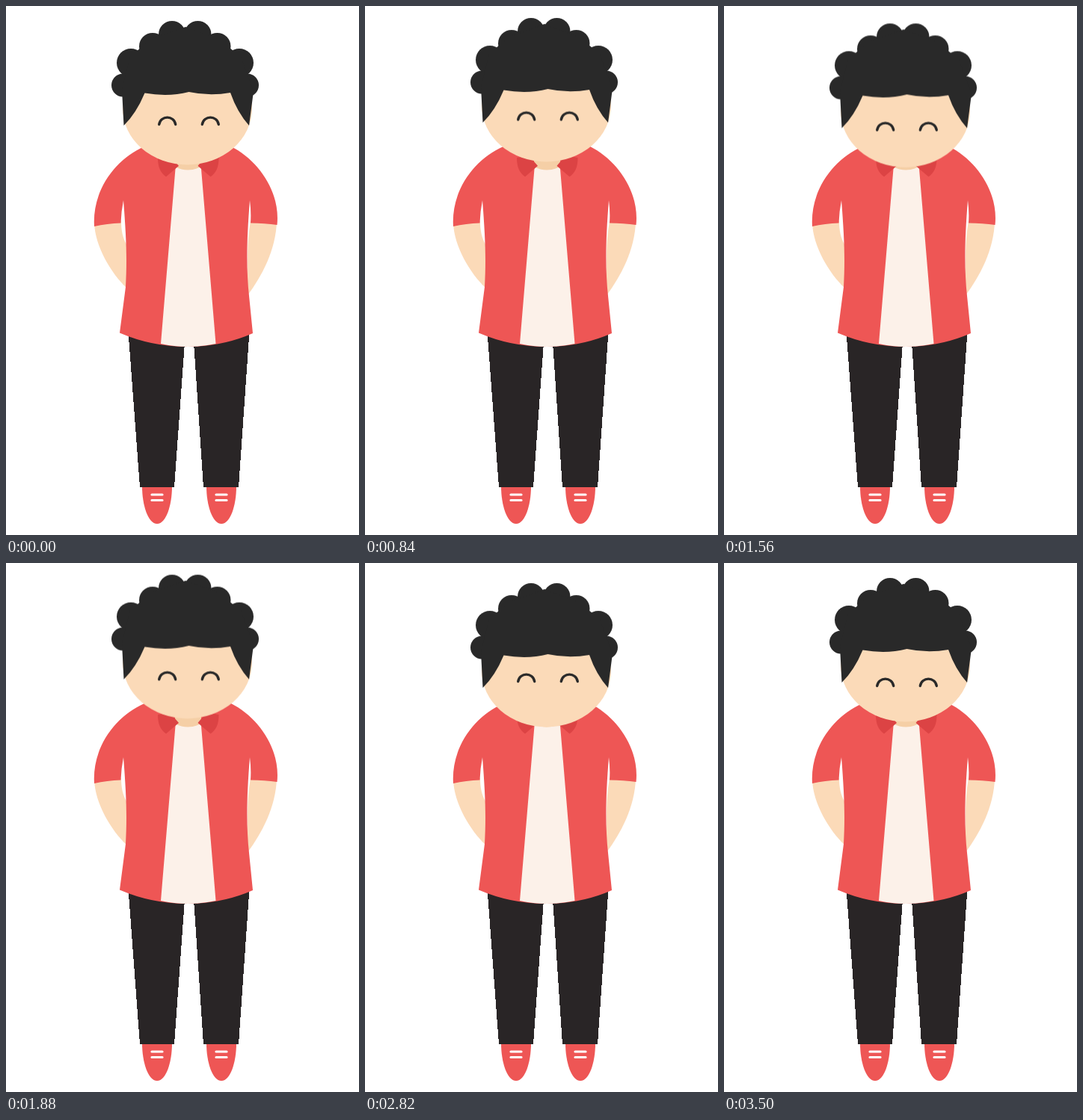
An HTML page without scripts for the animation above (3.64 s loop, 472 px wide and 708 px high).

```html
<!DOCTYPE html>
<html lang="en">
<head>
<meta charset="utf-8">
<title>Nodding boy</title>
<style>
  html, body { margin: 0; width: 100%; height: 100%; overflow: hidden; background: #fff; }
  svg { display: block; width: 472px; height: 708px; }

  .red { fill: #ee5655; }
  .collar { fill: #dc4344; }
  .skin { fill: #fbdab8; }
  .neck { fill: #f5cfa6; }
  .tee { fill: #fcf1e9; }
  .pants { fill: #292526; shape-rendering: crispEdges; }
  .hair { fill: #292929; }
  .laces { fill: none; stroke: #fff; stroke-width: 3.2; stroke-linecap: round; }
  .smile { fill: none; stroke: #292929; stroke-width: 3.4; stroke-linecap: round; }

  .head, .eyes { animation: 3640ms linear infinite; }
  .head { animation-name: nod; }
  .eyes { animation-name: glance; }

  /* 36.4ms per percent; the last 140ms hold still */
  @keyframes nod {
    0% { transform: translateY(0); }
    8% { transform: translateY(-5.8px); }
    15.9% { transform: translateY(-10px); }
    23.08% { transform: translateY(-4px); }
    29.67% { transform: translateY(.8px); }
    34.62% { transform: translateY(5.7px); }
    38.2% { transform: translateY(7.5px); }
    44.51% { transform: translateY(2px); }
    51.65% { transform: translateY(-4.3px); }
    58% { transform: translateY(-10px); }
    65.93% { transform: translateY(-2px); }
    74.18% { transform: translateY(4.5px); }
    77.47% { transform: translateY(7px); }
    81% { transform: translateY(8.3px); }
    89.01% { transform: translateY(3.5px); }
    96.15%, 100% { transform: translateY(0); }
  }
  @keyframes glance {
    0% { transform: translateY(0); }
    10% { transform: translateY(-7px); }
    18% { transform: translateY(-10px); }
    23.08% { transform: translateY(-6.5px); }
    34.62% { transform: translateY(10.5px); }
    39% { transform: translateY(12px); }
    51.65% { transform: translateY(-2.7px); }
    60% { transform: translateY(-9px); }
    65.93% { transform: translateY(-6px); }
    77.47% { transform: translateY(0); }
    88% { transform: translateY(7px); }
    96.15%, 99.99% { transform: translateY(6px); }
    100% { transform: translateY(0); }
  }
</style>
</head>
<body>
<svg viewBox="0 0 472 708">
  <defs>
    <g id="shoe">
      <path class="red" d="M-20 643H20C20 668 12 693 0 693S-20 668-20 643Z"/>
      <path class="laces" d="M-7 654H7M-7 661.5H7"/>
    </g>
    <path id="eye" class="smile" d="M-11 158.5C-9 146 9 146 11 158.5"/>
  </defs>

  <use href="#shoe" x="202"/>
  <use href="#shoe" x="288"/>
  <path class="pants" d="M163.500 436L179 644H225L239 450ZM251 450L264 644H311L325.500 436Z"/>

  <!-- forearms -->
  <path class="skin" d="M118 290C119 322 141 358 161 377V319C156 310 154 300 154 288Z"/>
  <path class="skin" d="M362 288C361 326 342 362 323 387V335C323 315 325 300 327 288Z"/>

  <!-- shirt -->
  <path class="red" d="M185 188C146 205 115 247 118 295Q135 291 153.500 290.500Q154 275 157 260C161 310 162 340 160 376L152 437.500Q195 456 242 456T330 438L325 388C321 350 322 310 326 260Q328 275 327 290.500Q346 290.500 362.500 293C367 249 338 207 301 188Z"/>
  <path class="tee" d="M227 212H260.500L280.500 452Q243 460 207 452Z"/>
  <path class="neck" d="M226 195H261V215Q243 224 226 215Z"/>
  <path class="collar" d="M203 203C203 217 207 223 214 228.500L231 214L219 200Z"/>
  <path class="collar" d="M284.500 203C284.500 217 280.500 223 273.500 228.500L256.500 214L268 200Z"/>

  <g class="head">
    <ellipse class="skin" cx="242.500" cy="137" rx="86.500" ry="75.500"/>
    <g class="hair">
      <circle cx="222" cy="38" r="18"/>
      <circle cx="256.500" cy="38" r="18"/>
      <circle cx="196" cy="54" r="18"/>
      <circle cx="282.500" cy="54" r="18"/>
      <circle cx="167" cy="76" r="19"/>
      <circle cx="312" cy="76" r="19"/>
      <circle cx="156.500" cy="106" r="15.500"/>
      <circle cx="322.500" cy="106" r="15.500"/>
      <path d="M155 112L157.500 160Q174 144 185.500 116.500Q217 122 244.500 115Q272 121 300 116Q309 142 325 160L331 114L314 68L284 44L240 28L194 44L166 68Z"/>
    </g>
  </g>
  <g class="eyes">
    <use href="#eye" x="215.700"/>
    <use href="#eye" x="273.300"/>
  </g>
</svg>
</body>
</html>
```
